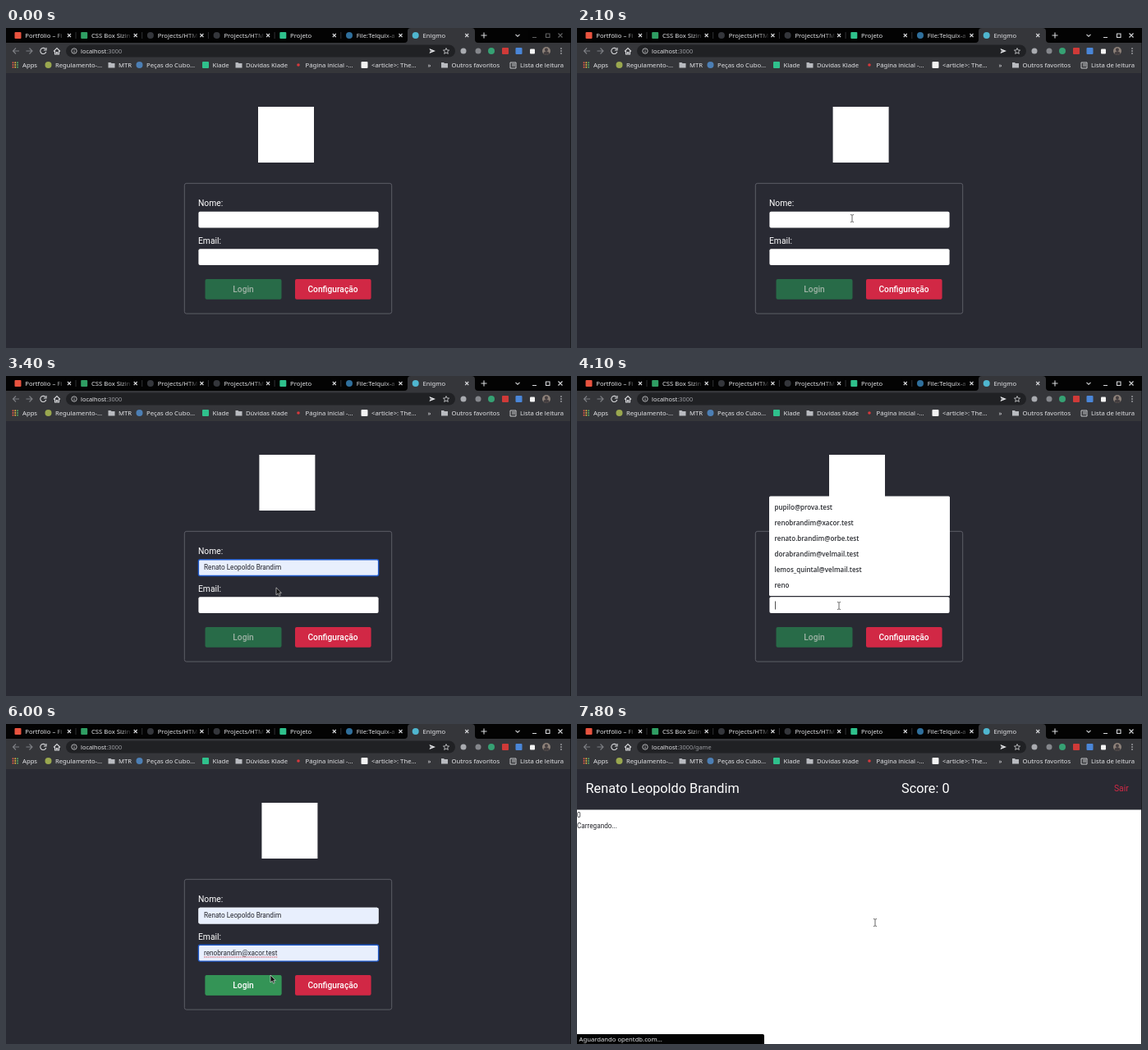
An HTML page that plays this animation: 688x390 px, repeating every 8 s.

```html
<!DOCTYPE html>
<html lang="pt-BR">
<head>
<meta charset="utf-8">
<title>Enigmo</title>
<style>
html, body { margin: 0; width: 100%; height: 100%; overflow: hidden; background: #292a33; }
svg { display: block; width: 688px; height: 390px; }
.ui { font: 7.7px "Noto Sans", "Open Sans", sans-serif; fill: #e4e5e8; }
.url { font-size: 7.4px; }
.dim { fill: #9a9ca1; }
.page { font-family: Roboto, sans-serif; fill: #fff; }
.label { font-size: 10.3px; }
.button { font-size: 10.2px; font-weight: 500; text-anchor: middle; }
.value { font-size: 8.2px; fill: #23242a; }
.preview { font: 7.1px "Liberation Sans", Arial, sans-serif; fill: #23242a; }
.option { font: 600 8px "Open Sans", "Noto Sans", sans-serif; fill: #2b2d32; }
.big { font-size: 16.3px; }
.line { fill: none; stroke: #d6d7da; stroke-width: 1.1; }
.field { x: 234.4px; width: 219.2px; height: 19.8px; rx: 2px; }
.filled { fill: #e8effd; }
.ring { fill: none; stroke: #1f58c7; stroke-width: 1.4; }

/* Everything shares one 8 s clock; 1.25% is 100 ms. */
.on { visibility: hidden; animation: 8s step-end infinite; }
#logo { animation: sway 8s ease-in-out infinite; }
#pointer { visibility: hidden; animation: show 8s step-end infinite, move 8s ease-in-out infinite; }
#unfocused { animation-name: unfocused; }
#nameRing { animation-name: nameRing; }
#namePopup { animation-name: namePopup; }
#nameHover { animation-name: nameHover; }
#nameValue { animation-name: nameValue; }
#emailRing { animation-name: emailRing; }
#emailPopup { animation-name: emailPopup; }
#emailHover { animation-name: emailHover; }
#caret { animation-name: caret; }
#emailPreview { animation-name: emailPreview; }
#ready { animation-name: ready; }
#game, #path { animation-name: game; }
#arrow { animation-name: arrow; }
#beam { animation-name: beam; }
#hand { animation-name: hand; }

@keyframes sway {
  0%, 52.5%, 100% { transform: translateX(0); }
  26.25%, 78.75% { transform: translateX(4.6px); }
}
@keyframes show { 0% { visibility: hidden; } 6.25%, 100% { visibility: visible; } }
@keyframes move {
  0%, 6.25% { transform: translate(400px, 250px); }
  13.75%, 16.25% { transform: translate(343px, 218px); }
  21.25%, 30% { transform: translate(335px, 232px); }
  36.25%, 40% { transform: translate(332px, 251px); }
  47.5%, 53.75% { transform: translate(319px, 280px); }
  61.25%, 68.75% { transform: translate(319.5px, 184px); }
  75% { transform: translate(322px, 306px); }
  81.25%, 91.25% { transform: translate(306px, 318px); }
  96.25%, 100% { transform: translate(363px, 242px); }
}
@keyframes unfocused { 0% { visibility: visible; } 6.25%, 100% { visibility: hidden; } }
@keyframes nameRing { 0% { visibility: hidden; } 28.75% { visibility: visible; } 50%, 100% { visibility: hidden; } }
@keyframes namePopup { 0% { visibility: hidden; } 28.75% { visibility: visible; } 41.25%, 100% { visibility: hidden; } }
@keyframes nameHover { 0% { visibility: hidden; } 36.25% { visibility: visible; } 41.25%, 100% { visibility: hidden; } }
@keyframes nameValue { 0% { visibility: hidden; } 37.5%, 100% { visibility: visible; } }
@keyframes emailRing { 0% { visibility: hidden; } 52.5%, 100% { visibility: visible; } }
@keyframes emailPopup { 0% { visibility: hidden; } 50% { visibility: visible; } 68.75%, 100% { visibility: hidden; } }
@keyframes emailHover {
  0% { visibility: hidden; transform: translateY(76px); }
  55% { visibility: visible; transform: translateY(76px); }
  56.25% { visibility: visible; transform: translateY(57px); }
  57.5% { visibility: visible; transform: translateY(38px); }
  58.75% { visibility: visible; transform: translateY(19px); }
  60% { visibility: visible; transform: translateY(0); }
  68.75%, 100% { visibility: hidden; transform: translateY(0); }
}
@keyframes caret { 0% { visibility: hidden; } 50% { visibility: visible; } 60%, 100% { visibility: hidden; } }
@keyframes emailPreview { 0% { visibility: hidden; } 60% { visibility: visible; } 68.75%, 100% { visibility: hidden; } }
@keyframes ready { 0% { visibility: hidden; } 68.75%, 100% { visibility: visible; } }
@keyframes game { 0% { visibility: hidden; } 92.5%, 100% { visibility: visible; } }
@keyframes arrow {
  0% { visibility: hidden; } 6.25% { visibility: visible; } 18.75% { visibility: hidden; }
  32.5% { visibility: visible; } 45% { visibility: hidden; }
  56.25% { visibility: visible; } 76.25%, 100% { visibility: hidden; }
}
@keyframes beam {
  0% { visibility: hidden; } 18.75% { visibility: visible; } 32.5% { visibility: hidden; }
  45% { visibility: visible; } 56.25% { visibility: hidden; } 92.5%, 100% { visibility: visible; }
}
@keyframes hand { 0% { visibility: hidden; } 76.25% { visibility: visible; } 92.5%, 100% { visibility: hidden; } }
</style>
</head>
<body>
<svg viewBox="0 0 688 390">
  <defs>
    <linearGradient id="fade">
      <stop offset="0" stop-color="#030303" stop-opacity="0"/>
      <stop offset="1" stop-color="#030303"/>
    </linearGradient>
  </defs>

  <rect width="688" height="390" fill="#292a33"/>

  <g class="page">
    <rect id="logo" x="307" y="96" width="68" height="68" fill="#fff"/>
    <rect x="217.3" y="189.3" width="252.4" height="158.8" rx="2.5" fill="none" stroke="#5d5e67"/>
    <text class="label" x="234" y="216.7">Nome:</text>
    <text class="label" x="234" y="262.5">Email:</text>
    <rect class="field" y="223.7"/>
    <rect class="field" y="269.3"/>
    <rect x="242.5" y="306" width="93" height="24.7" rx="2" fill="#286b48"/>
    <text class="button" x="289" y="321.5" fill="#9fb3a6">Login</text>
    <rect x="352" y="306" width="92.6" height="24.7" rx="2" fill="#d12845"/>
    <text class="button" x="398" y="321.5">Configuração</text>

    <g id="nameValue" class="on">
      <rect class="field filled" y="223.7"/>
      <text class="value" x="241" y="236.3">Renato Leopoldo Brandim</text>
    </g>
    <rect id="nameRing" class="on field ring" y="223.7"/>
    <g id="emailPreview" class="on">
      <rect class="field filled" y="269.3"/>
      <text class="preview" x="240.5" y="282">renobrandim@xacor.test</text>
    </g>
    <path id="caret" class="on" d="M241.5 274.5v10" stroke="#222" stroke-width=".8"/>
    <g id="ready" class="on">
      <rect class="field filled" y="269.3"/>
      <text class="value" x="241" y="281.8">renobrandim@xacor.test</text>
      <path d="M241 284H331" stroke="#d8555d" stroke-dasharray="1.5 .8"/>
      <rect x="242.5" y="306" width="93" height="24.7" rx="2" fill="#349456"/>
      <text class="button" x="289" y="321.5">Login</text>
    </g>
    <rect id="emailRing" class="on field ring" y="269.3"/>
  </g>

  <g id="namePopup" class="on">
    <rect x="234" y="245" width="220" height="121.5" rx="1.5" fill="#fff"/>
    <rect id="nameHover" class="on" x="234" y="248.7" width="220" height="19" fill="#e5e6e6"/>
  </g>
  <g id="emailPopup" class="on">
    <rect x="234" y="146.5" width="220" height="121.5" rx="1.5" fill="#fff"/>
    <rect id="emailHover" class="on" x="234" y="169.3" width="220" height="19" fill="#e5e6e6"/>
  </g>

  <g id="game" class="on page">
    <rect y="55" width="688" height="335"/>
    <rect y="55" width="688" height="49.5" fill="#292a33"/>
    <text class="big" x="10.5" y="83.8">Renato Leopoldo Brandim</text>
    <text class="big" x="395" y="83.8">Score: 0</text>
    <text class="label" x="654" y="81.5" fill="#d12845">Sair</text>
    <text class="value" x="0" y="114">0</text>
    <text class="value" x="0" y="126.7">Carregando...</text>
    <path d="M0 378H226a2 2 0 0 1 2 2V390H0z" fill="#030303"/>
    <text class="ui" x="2.5" y="387">Aguardando opentdb.com…</text>
  </g>

  <g id="chrome" class="ui">
    <rect width="688" height="18" fill="#030303"/>
    <rect y="18" width="688" height="37" fill="#35363a"/>
    <path d="M485 18q4 0 4-4V4q0-4 4-4H567q4 0 4 4V14q0 4 4 4z" fill="#35363a"/>
    <rect x="73" y="20.5" width="474" height="15" rx="7.5" fill="#202124"/>
    <g class="line">
      <path d="M578.5 9h7M582 5.5v7M620.5 7.8l2.5 2.5 2.5-2.5M641 11.5h5M657.5 7h4.5v4.5h-4.5zM672.5 6.5l5 5m0-5l-5 5"/>
      <path d="M16 28H8.5m3.5-3.5L8.5 28l3.5 3.5M24.5 28H32m-3.5-3.5L32 28l-3.5 3.5" stroke="#7d7f84"/>
      <path d="M48 25.5a3.6 3.6 0 1 0 .8 3.5M49 24v3h-3M58 28.5l4-4 4 4M59.500 28v4h1.800v-2.500h1.400V32h1.800v-4"/>
      <circle cx="83" cy="28" r="3.2" stroke-width=".8"/>
      <path d="M83 27.5v2.3M83 26v.7" stroke-width=".8"/>
      <path d="M536 24.5l1 2.4 2.6.2-2 1.7.7 2.6-2.300-1.400-2.300 1.400.7-2.600-2-1.700 2.600-.2z" stroke-width=".8"/>
      <path d="M614 42h7v7h-7zM616 44h4M616 46h4" stroke-width=".9"/>
    </g>
    <path d="M515.5 25l7.500 3-7.500 3 1-2.500 3-.5-3-.5z"/>
    <text class="url" x="91" y="30.7">localhost<tspan class="dim">:3000</tspan><tspan id="path" class="on dim">/game</tspan></text>
    <rect x="638" y="25.5" width="6" height="6" rx="1" fill="#f4f4f4"/>
    <circle cx="658" cy="28" r="5" fill="#8c8078"/>
    <path d="M654.5 31.500a3.500 3 0 0 1 7 0 5 5 0 0 1-7 0zM658 24.500a2 2 0 1 1-.1 0z" fill="#443e40"/>
    <text x="513.5" y="47.8">»</text>
  </g>
  <rect id="unfocused" class="on" x="636" y="3" width="46" height="12" fill="#030303" fill-opacity=".55"/>
  <path d="M687.5 18V390" stroke="#1b1b1f"/>

  <g id="pointer">
    <path id="arrow" class="on" d="M0 0V9L2.200 7.200 3.700 10.300 5.200 9.600 3.800 6.600H6.400z" fill="#111" stroke="#eee" stroke-width=".6"/>
    <path id="beam" class="on" d="M-2-4.500Q0-4.500 0-3.500 0-4.500 2-4.500M0-3.500V3.500M-2 4.500Q0 4.500 0 3.500 0 4.500 2 4.500" fill="none" stroke="#555" stroke-width=".9"/>
    <path id="hand" class="on" d="M-1 0Q0-1 1 0V4L5 5Q6 5.500 5.500 8L4.500 11H0L-3.500 6.500Q-3 5-1 6.500z" fill="#111" stroke="#eee" stroke-width=".6"/>
  </g>
</svg>
<script>
const chrome = document.getElementById("chrome");

function add(parent, tag, attrs, text) {
  const el = document.createElementNS("http://www.w3.org/2000/svg", tag);
  for (const key in attrs) el.setAttribute(key, attrs[key]);
  if (text) el.textContent = text;
  return parent.appendChild(el);
}
function dot(x, y, fill, r = 4) {
  add(chrome, "circle", { cx: x, cy: y, r, fill });
}
function box(x, y, fill, size = 8) {
  add(chrome, "rect", { x: x - size / 2, y: y - size / 2, width: size, height: size, rx: 1, fill });
}
function folder(x, y) {
  add(chrome, "path", { d: `M${x - 4} ${y - 3}h3l1 1h4v5.5h-8z`, fill: "#b9bbc0" });
}

const tabs = [
  ["Portfólio – Fi", box, "#e8533f"],
  ["CSS Box Sizin", box, "#2f9e63"],
  ["Projects/HTM", dot, "#34363b"],
  ["Projects/HTM", dot, "#34363b"],
  ["Projeto", box, "#2fc18c"],
  ["File:Telquix-a", dot, "#2f6f9c"],
  ["Enigmo", dot, "#4fb6cf"]
];
tabs.forEach(([title, icon, color], i) => {
  const x = 14.5 + i * 80.7, end = x + 62.5;
  icon(x, 9, color);
  add(chrome, "text", { x: x + 8.8, y: 11.7 }, title);
  if (i < 6) {
    add(chrome, "rect", { x: end - 18, y: 2, width: 14, height: 14, fill: "url(#fade)" });
    add(chrome, "rect", { x: end - 4.2, y: 2, width: 11, height: 14, fill: "#030303" });
  }
  if (i < 5) add(chrome, "path", { d: `M${end + 8} 5v8`, stroke: "#3c3d40", "stroke-width": 0.8 });
  add(chrome, "path", { d: `M${end - 2} 7l4 4m0-4l-4 4`, class: "line" });
});

const bookmarks = [
  [20, "Apps"],
  [60, "Regulamento-…", dot, "#9aa84f"],
  [137, "MTR", folder],
  [171, "Peças do Cubo…", dot, "#4c7fb5"],
  [251.5, "Klade", box, "#2fc18c"],
  [292, "Dúvidas Klade", folder],
  [364.5, "Página inicial -…", dot, "#d8383c", 1.8],
  [445, "<article>: The…", box, "#f2f2f2"],
  [542.5, "Outros favoritos", folder],
  [626, "Lista de leitura"]
];
for (const [x, title, icon, ...style] of bookmarks) {
  if (icon) icon(x - 8.5, 45, ...style);
  add(chrome, "text", { x, y: 47.8 }, title);
}
const gridColors = ["#e25a4d", "#e6b541", "#55a868"];
for (let i = 0; i < 9; i++) box(8.5 + i % 3 * 2.8, 42.2 + Math.floor(i / 3) * 2.8, gridColors[i % 3], 1.9);

dot(557, 28, "#a9abb0", 3.5);
dot(575, 28, "#85878c", 3.5);
dot(591, 28, "#36a173");
box(608, 28, "#cf3a38");
box(624.5, 28, "#4a86d8");
for (const y of [25, 28, 31]) dot(676, y, "#d6d7da", 0.8);

function options(id, y, list) {
  const popup = document.getElementById(id);
  list.forEach((text, i) => add(popup, "text", { class: "option", x: 240.5, y: y + i * 19 }, text));
}
options("namePopup", 261, ["Renato Leopoldo Brandim", "Renato Brandim Grupo 27 C", "Lumes", "aaa", "Nádia VJ", "Projeto Alvorar"]);
options("emailPopup", 163, ["pupilo@prova.test", "renobrandim@xacor.test", "renato.brandim@orbe.test",
  "dorabrandim@velmail.test", "lemos_quintal@velmail.test", "reno"]);
</script>
</body>
</html>
```
